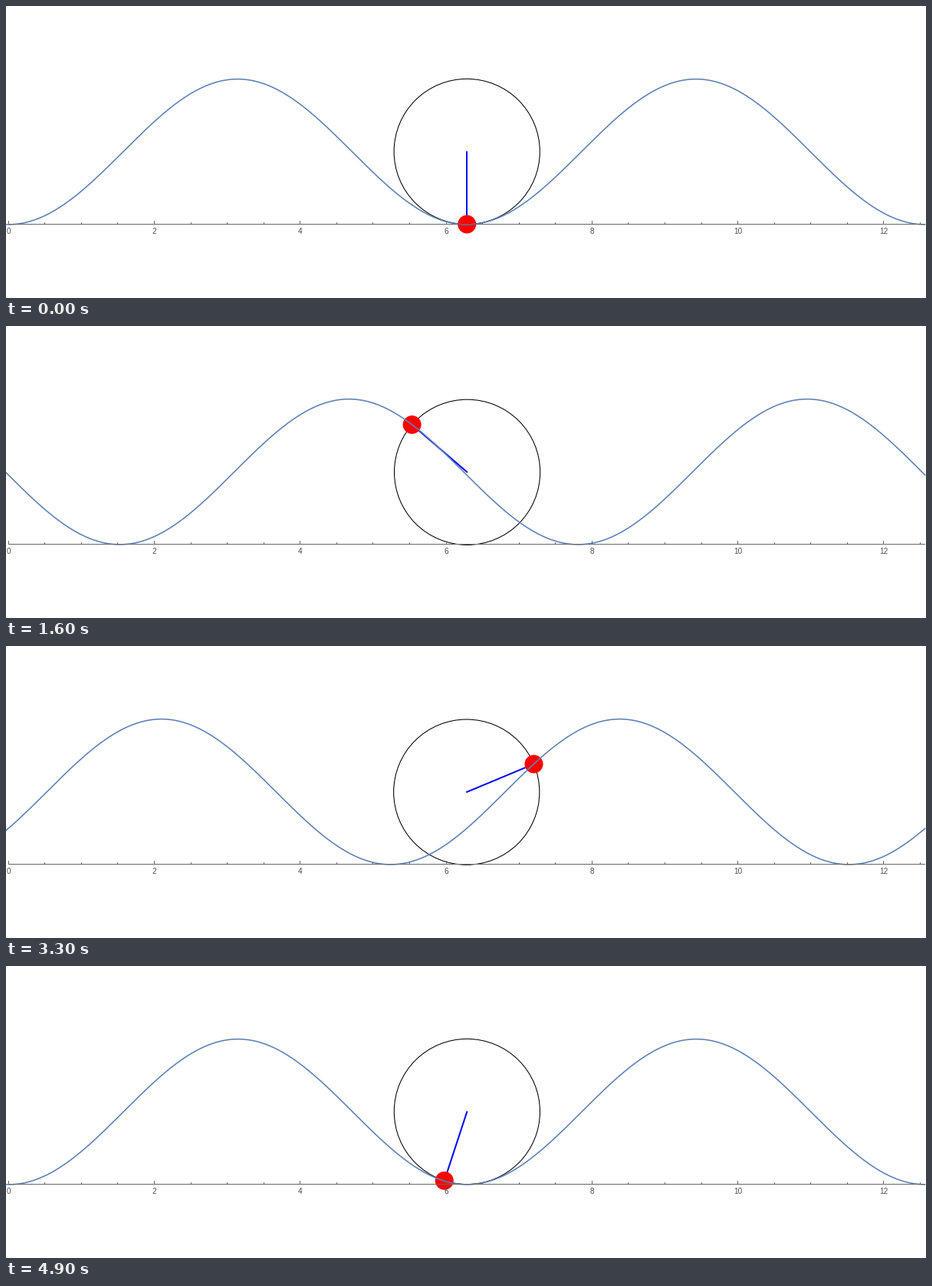
Animation of 1200 by 382 pixels, one loop 5 s. Source, as a matplotlib script:

```python
import math

import numpy as np
import matplotlib.pyplot as plt
from matplotlib.animation import FuncAnimation
from matplotlib.patches import Circle

W, H, DPI = 1200, 382, 100
FRAMES, INTERVAL = 50, 100
STEP = 0.25                  # radians turned per frame
X0, Y0, UNIT = 3.2, 285.9, 95.14
AXIS_Y = 285.5
RADIUS = 95.1
CENTRE = (601.2, 190.95)
DRIFT = 0.5                  # the wheel shifts slightly away from the ball
GREY = "0.4"


def pt(px):
    return px * 72 / DPI


def to_px(x):
    return X0 + UNIT * x


plt.rcParams["font.family"] = "Liberation Sans"
fig = plt.figure(figsize=(W / DPI, H / DPI), dpi=DPI, facecolor="white")
ax = fig.add_axes([0, 0, 1, 1])
ax.set_xlim(0, W)
ax.set_ylim(H, 0)
ax.axis("off")


def stroke(xs, ys, color, width, z, **kw):
    line, = ax.plot(xs, ys, color=color, lw=pt(width), zorder=z,
                    solid_capstyle="butt", **kw)
    return line


def draw_axis():
    stroke([3, 1199], [AXIS_Y, AXIS_Y], GREY, 1, 6, snap=False)
    for i in range(26):
        x = math.floor(to_px(i / 2)) + 0.5
        major = i % 4 == 0
        stroke([x, x], [AXIS_Y, 281 if major else 283], GREY, 1, 6, snap=False)
        if major:
            ax.text(to_px(i / 2), 298, str(i // 2), fontsize=pt(10),
                    color="0.3", ha="center", va="baseline", zorder=7)


draw_axis()
wheel = ax.add_patch(Circle(CENTRE, RADIUS, fill=False, ec="black",
                            lw=pt(1.05), zorder=2))
spoke = stroke([], [], "#0000ff", 2, 3)
ball = ax.add_patch(Circle(CENTRE, 12, fc="#ff0000", ec="none", zorder=4))
wave_px = np.linspace(-1, 1199.2, 1201)
wave_x = (wave_px - X0) / UNIT
wave = stroke(wave_px, wave_px, "#5e81b5", 1.6, 5)


def update(n):
    t = STEP * n
    dx, dy = math.sin(t), math.cos(t)
    cx, cy = CENTRE[0] - DRIFT * dx, CENTRE[1] - DRIFT * dy
    bx, by = cx + RADIUS * dx, cy + RADIUS * dy
    wheel.center = cx, cy
    ball.center = bx, by
    spoke.set_data([cx - 0.5 * dx, bx], [cy - 0.5 * dy, by])
    # cycloid phase keeps the ball on the wave
    wave.set_ydata(Y0 - UNIT * (1 - np.cos(wave_x + t - math.sin(t))))
    return wheel, spoke, ball, wave


anim = FuncAnimation(fig, update, frames=FRAMES, interval=INTERVAL,
                     repeat=True, repeat_delay=0)
plt.show()
```
